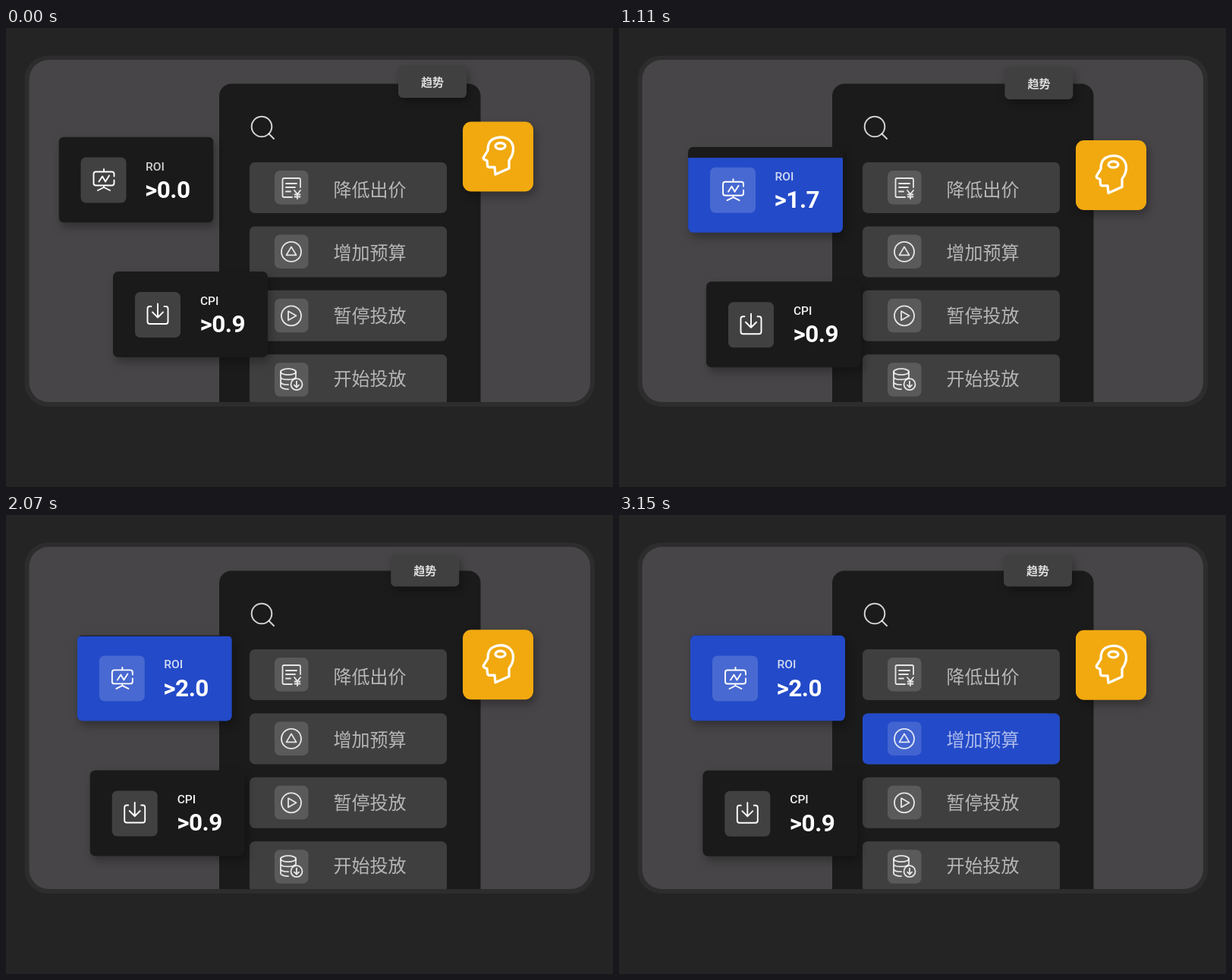
These frames come from a looping animation (800 px wide and 605 px high, 5400 ms). An HTML page:

```html
<!DOCTYPE html>
<html lang="zh-CN">
<head>
<meta charset="utf-8">
<title>Trend panel</title>
<style>
  html, body { margin: 0; width: 100%; height: 100%; overflow: hidden; background: #242424; }
  svg { display: block; width: 100%; height: 100%; }
  .zh { font-family: "Noto Sans CJK SC", "Noto Sans CJK", sans-serif; }
  .row-text { font-size: 24px; font-weight: 300; fill: #fff; fill-opacity: .62; }
  .tag-text { font-size: 15px; font-weight: 700; fill: #ddd; }
  .label { font: 500 15.5px Roboto, sans-serif; fill: #fff; }
  .value { font: 700 31.5px Roboto, sans-serif; fill: #fff; letter-spacing: -.5px; }
  .icon { fill: none; stroke: #fff; stroke-linecap: round; stroke-linejoin: round; }
  .small { stroke-width: 1.8; stroke-opacity: .85; }
  .card { filter: drop-shadow(3px 6px 6px rgba(0, 0, 0, .3)); }
</style>
</head>
<body>
<svg viewBox="0 0 800 605">
  <defs>
    <clipPath id="panelClip"><rect x="30.5" y="42" width="739.5" height="451" rx="26"/></clipPath>
    <clipPath id="cardClip"><rect width="204" height="113" rx="7"/></clipPath>
  </defs>

  <rect width="800" height="605" fill="#242424"/>
  <rect x="24.5" y="36.5" width="751.5" height="462.5" rx="31" fill="#2d2d2d"/>
  <g clip-path="url(#panelClip)">
    <rect x="30" y="42" width="740" height="451" fill="#474547"/>
    <rect x="281" y="73.5" width="344.5" height="450" rx="16" fill="#1b1b1b"/>
    <g class="icon" stroke-width="2" stroke-opacity=".8">
      <circle cx="337" cy="130" r="13.3"/><path d="M346.5 139.5l6.5 6.5"/>
    </g>
    <g id="rows"></g>
  </g>

  <g id="tag" class="card">
    <rect width="90" height="42.5" rx="6" fill="#414041"/>
    <text class="zh tag-text" x="30" y="27.5">趋势</text>
  </g>

  <g id="brain" class="card">
    <rect width="93" height="92" rx="11" fill="#f1a90f"/>
    <g class="icon" stroke-width="3.3">
      <path d="M34 30C36 23.500 43 20.500 50 20.500C60 20.500 66.500 27 66.500 36C66.500 44 63 48 61 51V61.500L43 69.500L42 60H35Q32.500 60 32.500 57L32 51.500L28 49.500Q26.500 48 28 46L33 38Q33 33 34 30Z"/>
      <ellipse cx="49.500" cy="32" rx="6.500" ry="4"/>
    </g>
  </g>

  <g id="roi" class="card">
    <g clip-path="url(#cardClip)">
      <rect width="204" height="113" fill="#1a1a1a"/>
      <rect id="fill" width="204" height="113" fill="#234ac8"/>
    </g>
    <rect x="29" y="27" width="60" height="60" rx="7" fill="#fff" fill-opacity=".17"/>
    <path class="icon" stroke-width="1.9" transform="translate(29 27)"
      d="M30.500 15.500v3.500M44 25v-3a3 3 0 0 0-3-3H20a3 3 0 0 0-3 3v12a3 3 0 0 0 3 3h21a3 3 0 0 0 3-3v-4M24 32l4.500-7 4 7 5-8M30.500 37v2.500M22.500 43.500l8-4 8 4"/>
    <text class="label" x="114.500" y="44" fill-opacity=".8">ROI</text>
    <text class="value" id="roiValue" x="113.500" y="80.500"></text>
  </g>

  <g id="cpi" class="card">
    <rect width="204" height="113" rx="7" fill="#1a1a1a"/>
    <rect x="29" y="27" width="60" height="60" rx="7" fill="#fff" fill-opacity=".17"/>
    <path class="icon" stroke-width="1.9" transform="translate(29 27)"
      d="M21.500 19h-2a3 3 0 0 0-3 3v17a3 3 0 0 0 3 3h21a3 3 0 0 0 3-3V22a3 3 0 0 0-3-3h-2M30 15.500v18M23 26.500l7 7 7-7"/>
    <text class="label" x="115" y="43.500" fill-opacity=".95">CPI</text>
    <text class="value" x="114.500" y="80">&gt;0.9</text>
  </g>
</svg>

<script>
const LOOP = 5400, STEP = 30, REST = 3150;
const el = id => document.getElementById(id);

const rows = [
  ['降低出价', '<path d="M34 22V12a2 2 0 0 0-2-2H12.500a2 2 0 0 0-2 2V33a2 2 0 0 0 2 2H23M15 17h14M15 22h12M15 27.500h6M26 26l4 5 4-5M30 31v6M26.500 31.500h7M26.500 34.500h7"/>'],
  ['增加预算', '<circle cx="22" cy="22.500" r="13"/><path d="M22 16l6.500 11h-13z"/>'],
  ['暂停投放', '<circle cx="22" cy="22.500" r="13"/><path d="M18 16.500l10.500 6-10.500 6z"/>'],
  ['开始投放', '<ellipse cx="18" cy="12" rx="10" ry="4"/><path d="M8 12v19c0 2 4 4 10 4M28 12v7M8 18.500c0 5 20 5 20 0M8 25c0 3 5 4 10 4"/><circle cx="29" cy="28.500" r="7.500"/><path d="M29 24.500v8M26 29.500l3 3 3-3"/>']
];
el('rows').innerHTML = rows.map(([name, icon], i) => `
  <g transform="translate(321 ${177 + i * 84.4})">
    <rect width="260" height="67" rx="7" fill="#3f3f3f"/>
    ${i === 1 ? '<rect id="highlight" width="260" height="67" rx="7" fill="#234ac8"/>' : ''}
    <g transform="translate(33 11)">
      <rect width="44.500" height="44.500" rx="7" fill="#fff" fill-opacity=".14"/>
      <g class="icon small">${icon}</g>
    </g>
  </g>
  <text class="zh row-text" x="431.500" y="${221.5 + i * 83.2}">${name}</text>`).join('');

// Exponential settling from 0 to 1; a shape above 1 softens the start.
const settle = (t, rate, shape) => 1 - Math.exp(-rate * t ** shape);
const clamp = v => Math.min(1, Math.max(0, v));

function place(id, x, y, dx, dy, p) {
  el(id).setAttribute('transform', `translate(${x + dx * p} ${y + dy * p})`);
}

function draw(ms) {
  const t = ms / 1000;
  const drift = settle(t, 1.77, 1.05);
  const roi = settle(t, 1.84, 1.35);
  const fill = settle(t, 1.82, 1.2);

  place('tag', 517, 49.5, -10, 2.2, drift);
  place('brain', 602, 123.5, 0, 28.4, drift);
  place('roi', 69.5, 143.5, 24.5, 15, roi);
  place('cpi', 141, 321, -30.7, 15.7, settle(t, 1.63, 1.35));

  el('fill').setAttribute('y', 113 * (1 - fill));
  el('roiValue').textContent = '>' + (Math.floor(roi * 20 + .2) / 10).toFixed(1);

  // The value blinks twice once the count is done.
  const blink = clamp((ms - 2190) / 600);
  el('roiValue').setAttribute('opacity', .67 + .33 * Math.cos(blink * 4 * Math.PI));
  el('highlight').setAttribute('opacity', clamp((ms - 2820) / 330));
}

function frame() {
  const ms = performance.now() % LOOP;
  draw(Math.min(REST, Math.floor(ms / STEP) * STEP));
  requestAnimationFrame(frame);
}
frame();
</script>
</body>
</html>
```
